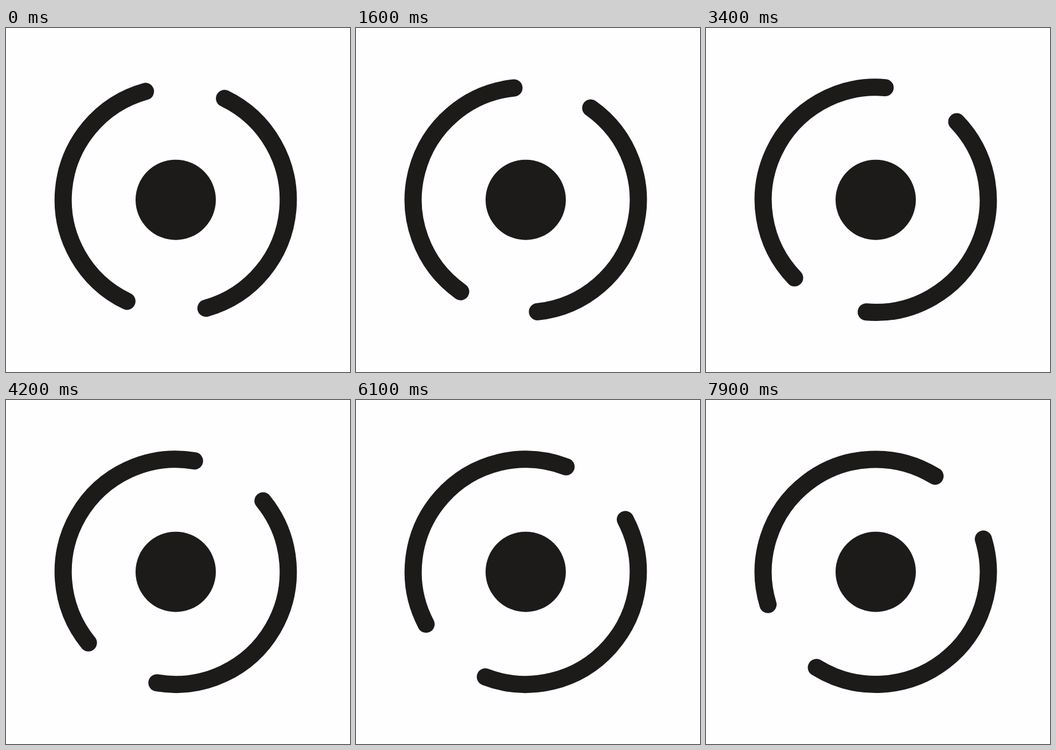
Recreate the animation shown at these times as an HTML page. Size 600 by 600 pixels, loop 8000 ms.

```html
<!DOCTYPE html>
<html lang="en">
<head>
<meta charset="utf-8">
<title>Turning ring</title>
<style>
  html, body { margin: 0; width: 100%; height: 100%; overflow: hidden; background: #fefdff; }
  svg { display: block; width: 100vw; height: 100vh; }
</style>
</head>
<body>
<svg viewBox="0 0 600 600">
  <g transform="translate(296 299.7)">
    <circle r="70" fill="#1c1b19"/>
    <g id="ring" fill="none" stroke="#1c1b19" stroke-width="30" stroke-linecap="round"></g>
  </g>
</svg>
<script>
  const LOOP = 8000, STEP = 100;
  const RADIUS = 196.3, SPAN = 138.7;
  const START = -15.6, SPEED = 6; // degrees, degrees per second
  const ring = document.getElementById('ring');

  // Angles are measured clockwise from the top.
  function point(deg) {
    const a = deg * Math.PI / 180;
    return `${RADIUS * Math.sin(a)} ${-RADIUS * Math.cos(a)}`;
  }

  function addArc(end) {
    const path = document.createElementNS('http://www.w3.org/2000/svg', 'path');
    path.setAttribute('d', `M${point(end - SPAN)}A${RADIUS} ${RADIUS} 0 0 1 ${point(end)}`);
    ring.append(path);
  }

  function draw(now) {
    const t = Math.floor((now % LOOP) / STEP) * STEP / 1000;
    ring.setAttribute('transform', `rotate(${START + SPEED * t})`);
  }

  addArc(0);
  addArc(180);

  let origin = null;
  function tick(now) {
    origin ??= now;
    draw(now - origin);
    requestAnimationFrame(tick);
  }
  draw(0);
  requestAnimationFrame(tick);
</script>
</body>
</html>
```
